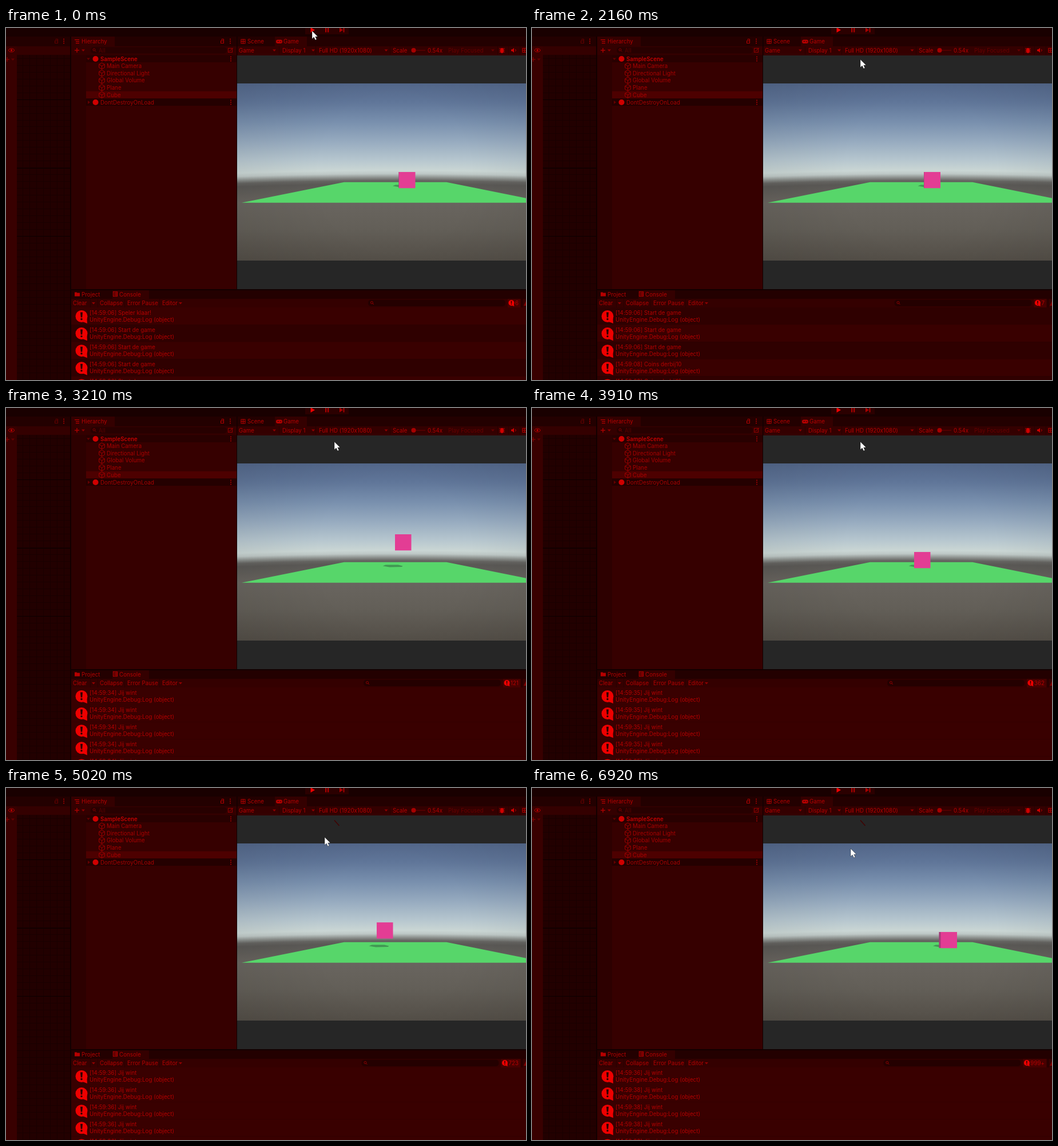
Animation, 909 px wide and 616 px high, one loop 7320 ms. Source, as an HTML page with a canvas:

```html
<!DOCTYPE html>
<html lang="nl">
<head>
<meta charset="utf-8">
<title>Editor play mode</title>
<style>
html, body { margin: 0; width: 100%; height: 100%; overflow: hidden; background: #1a0000; }
canvas { display: block; }
</style>
</head>
<body>
<canvas id="stage" width="909" height="616"></canvas>
<script>
const LOOP = 7320, REST = 5710, STEP = 69.8, STEP_START = 60;
const ctx = document.getElementById('stage').getContext('2d');
const FONT = '9.7px Inter, sans-serif';
const TEXT = '#b60000', DIM = '#650000';
// Any tracking also keeps "1920x1080" and "14:59" free of contextual glyphs
ctx.letterSpacing = '0.05px';

// Rows of [time, value, ...]
const cursorPath = [[290, 535, 5], [970, 574, 55], [2570, 574, 55], [2640, 574, 59],
  [4120, 574, 59], [4800, 558, 74], [5016, 557, 86], [5300, 557, 106]];
const cubePath = [[500, 687], [1010, 768], [1526, 684], [1820, 703], [2154, 685.5],
  [2500, 722], [3201, 680], [3899, 668], [4400, 665], [5016, 648], [REST, 714.5]];
const winCount = [[2860, 7], [3201, 121], [3899, 362], [5016, 723], [5640, 1000]];
const jumps = [[1484, 660], [3159, 660], [4992, 712]];
const JUMP_HEIGHT = 130;

function track(keys, t) {
  if (t <= keys[0][0]) return keys[0].slice(1);
  for (let i = 1; i < keys.length; i++) {
    const a = keys[i - 1], b = keys[i];
    if (t < b[0]) {
      const p = (t - a[0]) / (b[0] - a[0]);
      return a.slice(1).map((v, n) => v + (b[n + 1] - v) * p);
    }
  }
  return keys[keys.length - 1].slice(1);
}

function heightAt(t) {
  for (const [start, span] of jumps) {
    const u = (t - start) / span * 2 - 1;
    if (Math.abs(u) < 1) return JUMP_HEIGHT * (1 - u * u);
  }
  return 0;
}

function rect(x, y, w, h, color) {
  ctx.fillStyle = color;
  ctx.fillRect(x, y, w, h);
}

function rounded(x, y, w, h, r, color) {
  ctx.fillStyle = color;
  ctx.beginPath();
  ctx.roundRect(x, y, w, h, r);
  ctx.fill();
}

function poly(points, color) {
  ctx.fillStyle = color;
  ctx.beginPath();
  points.forEach(([x, y]) => ctx.lineTo(x, y));
  ctx.closePath();
  ctx.fill();
}

function line(points, color, width = 1) {
  ctx.strokeStyle = color;
  ctx.lineWidth = width;
  ctx.beginPath();
  points.forEach(([x, y], i) => i ? ctx.lineTo(x, y) : ctx.moveTo(x, y));
  ctx.stroke();
}

function disc(x, y, r, color) {
  ctx.fillStyle = color;
  ctx.beginPath();
  ctx.arc(x, y, r, 0, Math.PI * 2);
  ctx.fill();
}

function ring(x, y, r, color) {
  ctx.strokeStyle = color;
  ctx.lineWidth = 1;
  ctx.beginPath();
  ctx.arc(x, y, r, 0, Math.PI * 2);
  ctx.stroke();
}

// y is the vertical middle of the text
function label(s, x, y, color = TEXT, bold = false) {
  ctx.font = (bold ? '600 ' : '') + FONT;
  ctx.fillStyle = color;
  ctx.fillText(s, x, y + 3.5);
}

const arrowDown = (x, y, color = '#900000') =>
  poly([[x - 3, y - 1.5], [x + 3, y - 1.5], [x, y + 2]], color);

function kebab(x, y) {
  for (let i = -1; i <= 1; i++) rect(x - 0.8, y + i * 3.5 - 0.8, 1.7, 1.7, TEXT);
}

function lock(x, y, color) {
  ctx.strokeStyle = color;
  ctx.lineWidth = 1;
  ctx.strokeRect(x - 2.5, y - 0.5, 5, 4);
  line([[x - 1, y - 2], [x - 1, y - 3.5], [x + 2.5, y - 3.5], [x + 2.5, y]], color);
}

function plus(x, y, color = '#b00000') {
  rect(x - 4, y - 0.7, 8, 1.4, color);
  rect(x - 0.7, y - 4, 1.4, 8, color);
}

function magnifier(x, y, color) {
  ring(x, y, 2, color);
  line([[x + 1.5, y + 1.5], [x + 3.5, y + 3.5]], color);
}

function gridIcon(x, y) {
  ctx.strokeStyle = TEXT;
  ctx.lineWidth = 1;
  ctx.strokeRect(x - 3.5, y - 3.5, 7, 7);
  line([[x - 4, y], [x + 4, y]], TEXT);
  line([[x, y - 4], [x, y + 4]], TEXT);
}

function cubeIcon(x, y) {
  const corners = [...Array(7).keys()].map(i => {
    const a = Math.PI / 6 + i * Math.PI / 3;
    return [x + 5.6 * Math.cos(a), y + 5.6 * Math.sin(a)];
  });
  line(corners, '#a00000');
  [3, 5, 1].forEach(i => line([[x, y], corners[i]], '#a00000'));
}

function sidePanel() {
  rect(0, 15, 113, 17, '#230000');
  rect(0, 32, 113, 15, '#340000');
  rect(0, 47, 113, 569, '#220000');
  for (let y = 53; y < 616; y += 11.95) rect(19, Math.round(y), 94, 1, '#190000');
  for (let x = 29; x < 113; x += 12) rect(x, 47, 1, 569, '#190000');
  for (const y of [125, 245, 364]) rect(19, y, 94, 1, '#0c0000');
  rect(0, 32, 19, 584, '#380000');
  ctx.strokeStyle = TEXT;
  ctx.lineWidth = 1;
  ctx.beginPath();
  ctx.ellipse(9.5, 39, 5, 3, 0, 0, Math.PI * 2);
  ctx.stroke();
  disc(9.5, 39, 1.8, TEXT);
  plus(2, 55, '#800000');
  arrowDown(12, 55, DIM);
  lock(88, 23, DIM);
  kebab(101, 23);
  rect(112, 15, 2, 601, '#120000');
}

function hierarchy() {
  rect(114, 15, 289, 17, '#230000');
  rect(114, 15, 76, 17, '#340000');
  rect(114, 32, 289, 15, '#340000');
  rect(114, 47, 289, 410, '#360000');
  rect(114, 47, 26, 410, '#2d0000');
  for (const y of [20.5, 23.5, 26.5]) rect(y > 21 ? 122 : 120, y - 0.5, y > 21 ? 6 : 8, 1.2, TEXT);
  label('Hierarchy', 132, 23.5);
  lock(378, 23, TEXT);
  kebab(392, 23);
  plus(124, 39);
  arrowDown(135, 39);
  rounded(148, 33.5, 238, 11, 5, '#270000');
  magnifier(154, 38, '#800000');
  label('All', 162, 39, '#580000');
  ctx.strokeStyle = '#900000';
  ctx.strokeRect(388.5, 35.5, 7, 7);
  line([[390, 41], [397, 35]], '#900000');

  rect(140, 47.3, 263, 12.7, '#280000');
  rect(140, 110.7, 263, 12.7, '#4d0000');
  rect(140, 123.4, 263, 12.7, '#240000');
  arrowDown(144, 54, DIM);
  poly([[143, 127], [143, 133], [147, 130]], DIM);
  disc(156.5, 54, 5, '#d00000');
  disc(156.5, 130, 5, '#d00000');
  label('SampleScene', 165, 54, '#c80000', true);
  ['Main Camera', 'Directional Light', 'Global Volume', 'Plane', 'Cube'].forEach((name, i) => {
    const y = 66.5 + i * 12.65;
    cubeIcon(167.5, y);
    label(name, 176, y, '#aa0000');
  });
  label('DontDestroyOnLoad', 165, 130, '#aa0000');
  kebab(393, 54);
  kebab(393, 130);
  rect(403, 15, 1.5, 442, '#120000');
}

function gameToolbar() {
  rect(0, 0, 909, 15, '#190000');
  rect(523, 0, 76, 11, '#2b0000');
  poly([[532.5, -1], [532.5, 8], [540, 3.5]], '#f00000');
  rect(558, 0, 2.3, 7.5, '#a80000');
  rect(562, 0, 2.3, 7.5, '#a80000');
  poly([[583, -0.5], [583, 7.5], [589, 3.5]], '#a80000');
  rect(589.5, 0, 2, 7.5, '#a80000');

  rect(404, 15, 505, 17, '#230000');
  rect(470, 15, 56, 17, '#340000');
  rect(404, 32, 505, 16, '#340000');
  gridIcon(414.5, 23.5);
  label('Scene', 422, 23.5);
  rounded(472, 20.5, 11, 6.5, 3, TEXT);
  rect(474.5, 23, 3, 1, '#340000');
  rect(479.5, 23, 1.5, 1.5, '#340000');
  label('Game', 485, 23.5);
  label('Game', 407, 39);
  arrowDown(469, 39);
  label('Display 1', 483, 39);
  arrowDown(537, 39);
  label('Full HD (1920x1080)', 547, 39);
  arrowDown(664.5, 39);
  label('Scale', 676, 39);
  rect(712, 38.5, 21, 1.2, DIM);
  disc(712.5, 39, 4, '#a80000');
  label('0.54x', 737, 39);
  label('Play Focused', 773, 39, DIM);
  arrowDown(851, 39, DIM);
  for (const x of [477, 541, 671, 859, 878, 898]) rect(x, 32, 1, 15, '#270000');
  for (const dy of [-3, 0, 3]) line([[862, 39 + dy], [872, 39 + dy]], TEXT);
  ctx.fillStyle = '#d00000';
  ctx.beginPath();
  ctx.ellipse(867, 39.5, 3, 4.5, 0, 0, Math.PI * 2);
  ctx.fill();
  poly([[883, 37.5], [885, 37.5], [888, 35], [888, 43], [885, 40.5], [883, 40.5]], '#d00000');
  line([[890, 37], [891.5, 39], [890, 41]], TEXT);
  gridIcon(906.5, 39);
}

// The horizon sinks slightly towards the sides
function backdrop() {
  const stops = [[97, '#53678a'], [130, '#607699'], [165, '#7990ae'], [200, '#98acc0'],
    [232, '#b7c7cf'], [249, '#cad6d4'], [255, '#bec8c6'], [261, '#909592'], [267, '#656461'],
    [273, '#5a5855'], [305, '#69655f'], [350, '#635f58'], [407, '#534e47']];
  for (let x = 404; x < 909; x += 5) {
    const sink = 5 * ((x - 680) / 276) ** 2;
    const column = ctx.createLinearGradient(0, 97, 0, 407);
    for (const [y, color] of stops) {
      const shifted = y > 240 && y < 300 ? y + sink : y;
      column.addColorStop((shifted - 97) / 310, color);
    }
    rect(x, 97, 5, 310, column);
  }
  const edge = ctx.createRadialGradient(680, 252, 130, 680, 252, 330);
  edge.addColorStop(0, 'rgba(0,0,0,0)');
  edge.addColorStop(1, 'rgba(0,0,0,0.08)');
  rect(404, 97, 505, 310, edge);
}

function gameView(cubeX, lift) {
  rect(404, 48, 505, 409, '#262626');
  backdrop();
  poly([[591, 269.7], [770, 269.7], [909, 297.7], [909, 305.7], [412, 305.7]], '#57d66a');

  const y = 252 - lift, backX = 680 + (cubeX - 680) * 0.91;
  const sx = backX - 10.5 - lift * 0.35, sy = 276.5;
  poly([[sx, sy], [sx + 5, sy - 1.9], [sx + 27, sy - 1.9], [sx + 35, sy],
        [sx + 33, sy + 1.6], [sx + 12, sy + 2]], '#419653');

  if (backX < cubeX) rect(backX, y, cubeX - backX + 0.5, 28, '#a33b78');
  rect(cubeX, y, 28.5, 28.3, '#e33d94');
}

function bubble(x, y, r) {
  disc(x, y, r, '#ee0000');
  poly([[x + r * 0.2, y + r * 0.9], [x + r * 0.9, y + r * 0.3], [x + r * 0.95, y + r * 1.2]], '#ee0000');
  const k = r / 10.5;
  poly([[x - 2 * k, y - 7 * k], [x + 2 * k, y - 7 * k], [x + 1.2 * k, y + 2 * k], [x - 1.2 * k, y + 2 * k]], '#2a0000');
  disc(x, y + 5 * k, 1.7 * k, '#2a0000');
}

function logRows(t) {
  if (t < 630) return ['06] Speler klaar!', ...Array(4).fill('06] Start de game')];
  if (t < 2850) return [...Array(3).fill('06] Start de game'), '08] Coins derbij10', '08] Coins derbij10'];
  const second = t < 3480 ? 34 : t < 4500 ? 35 : t < 5630 ? 36 : 38;
  return Array.from({ length: 5 }, (_, i) => `${i ? second : Math.min(second, 36)}] Jij wint`);
}

function consolePanel(t) {
  rect(114, 457, 795, 2, '#120000');
  rect(114, 459, 795, 15, '#230000');
  rect(186, 459, 64, 15, '#340000');
  rect(114, 474, 795, 15, '#340000');
  rect(120, 462.5, 4, 2, TEXT);
  rect(120, 463.5, 9, 6, TEXT);
  label('Project', 132, 466);
  ctx.strokeStyle = TEXT;
  ctx.lineWidth = 1;
  ctx.strokeRect(187.5, 461.5, 7, 8);
  for (const y of [463.5, 465.5, 467.5]) rect(189, y - 0.5, 5, 1, TEXT);
  label('Console', 198, 466);
  label('Clear', 117, 481.5);
  arrowDown(153, 481.5);
  label('Collapse', 164, 481.5);
  label('Error Pause', 212, 481.5);
  label('Editor', 273, 481.5);
  arrowDown(305, 481.5);
  for (const x of [147, 160, 207, 268]) rect(x, 474, 1, 15, '#280000');

  const total = t < 630 ? 6 : Math.round(track(winCount, t)[0]);
  const count = total > 999 ? '999+' : String(total);
  ctx.font = FONT;
  const countX = 896 - ctx.measureText(count).width;
  rounded(countX - 257, 475.5, 240, 11.5, 5, '#240000');
  magnifier(countX - 250.5, 480.5, '#900000');
  rect(countX - 13, 474, 912 - countX, 15, '#480000');
  bubble(countX - 6.5, 481, 5);
  label(count, countX, 481.5);
  rect(901, 474, 2, 15, '#230000');
  poly([[905, 486], [909, 478], [909, 486]], '#800000');

  // The stripes blur together once the log floods
  const flooded = total > 7;
  logRows(t).forEach((row, i) => {
    const y = 489 + i * 30.1;
    const dark = !flooded && (i + total) % 2 === 1;
    rect(114, y, 795, 30.2, dark ? '#2f0000' : '#390000');
    bubble(132, y + 15.5, 10.5);
    label('[14:59:' + row, 146, y + 9);
    label('UnityEngine.Debug:Log (object)', 146, y + 21);
  });
}

function pointer(x, y) {
  const shape = [[0, 0], [0, 14], [3.2, 11], [5.6, 16], [8, 15], [5.7, 10.2], [10, 10]]
    .map(([dx, dy]) => [x + dx, y + dy]);
  poly(shape, '#ffffff');
  line([...shape, shape[0]], 'rgba(0,0,0,0.55)', 0.7);
}

function draw(t) {
  if (t >= REST) t = REST;
  else t = STEP_START + Math.max(0, Math.floor((t - STEP_START) / STEP)) * STEP;
  rect(0, 0, 909, 616, '#1a0000');
  gameToolbar();
  sidePanel();
  hierarchy();
  gameView(track(cubePath, t)[0], heightAt(t));
  consolePanel(t);
  // faint streak left behind by the pointer
  if (t > 4190) line([[574, 56.5], [582.5, 66]], '#430000', 1.4);
  pointer(...track(cursorPath, t));
}

function tick() {
  draw(performance.now() % LOOP);
  requestAnimationFrame(tick);
}
tick();
</script>
</body>
</html>
```
